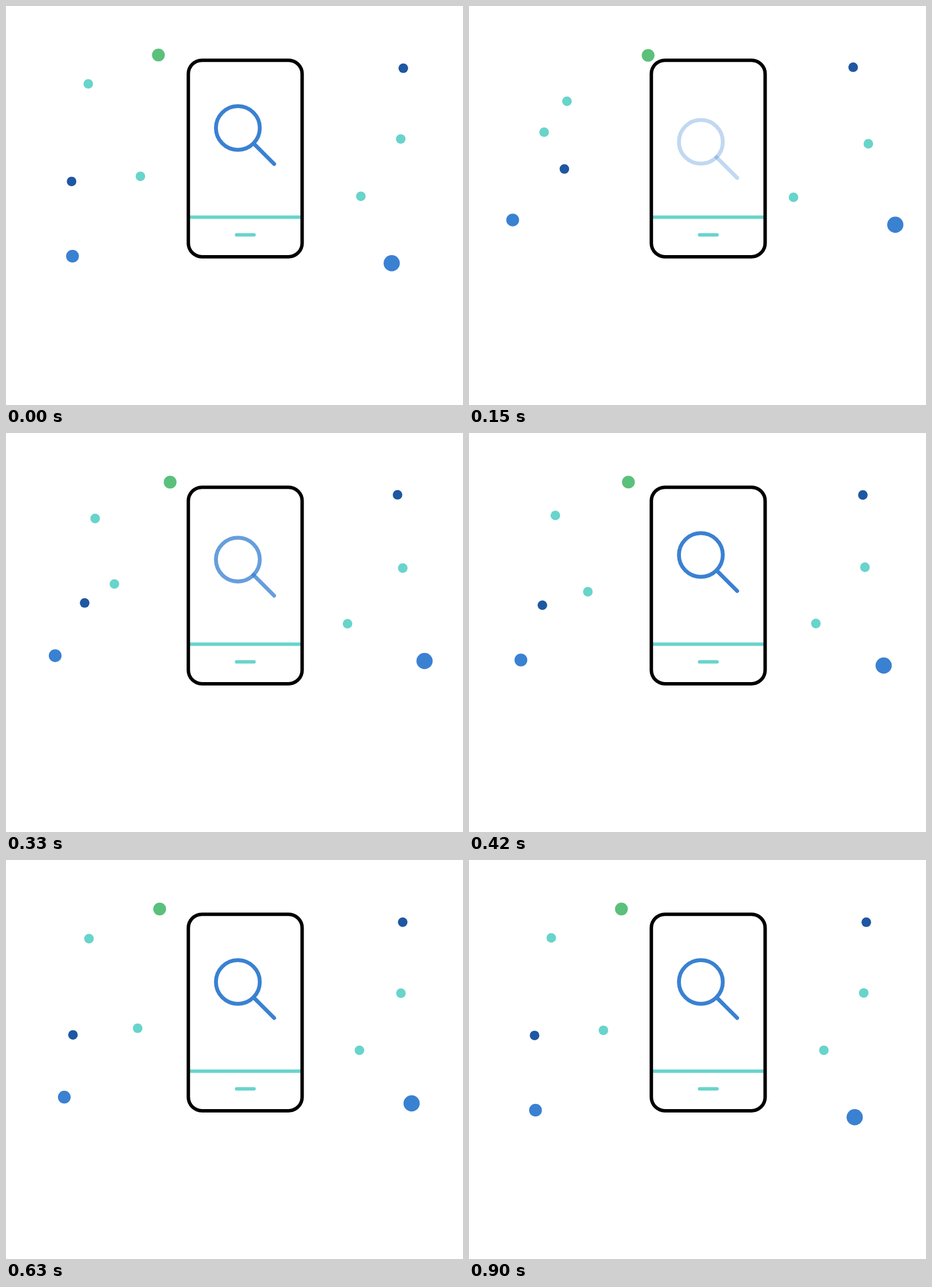
Write an HTML page that moves like this. It is 800x700 px and loops after 930 ms.

```html
<!DOCTYPE html>
<html lang="en">
<head>
<meta charset="utf-8">
<title>Mobile search</title>
<style>
  html, body { margin: 0; width: 100%; height: 100%; overflow: hidden; background: #fff; }
  svg { display: block; width: 100vw; height: 100vh; }
  .green { fill: #5bc07c; }
  .teal { fill: #68d4cb; }
  .navy { fill: #1e57a2; }
  .blue { fill: #3a81d2; }
  .bar { fill: none; stroke: #68d4cb; stroke-width: 6; }
  .glass > * { fill: none; stroke: #3a81d2; stroke-width: 6.8; stroke-linecap: round; }
</style>
</head>
<body>
<svg viewBox="0 0 800 700">
  <g id="dots"></g>
  <rect x="319.2" y="95.2" width="199.2" height="344.8" rx="24" fill="#fff"/>
  <path class="bar" d="M321 370.5H517"/>
  <path class="bar" d="M403.6 401.6H434.2" stroke-linecap="round"/>
  <rect x="319.2" y="95.2" width="199.2" height="344.8" rx="24" fill="none" stroke="#000" stroke-width="6"/>
  <g class="glass" id="glass">
    <circle cx="405.9" cy="214" r="38.4"/>
    <path d="M433.3 241L469.4 277.2"/>
  </g>
</svg>
<script>
  const LOOP = 930, STEP = 30, START = 30, END = 900;
  const glass = document.getElementById('glass');
  const layer = document.getElementById('dots');

  const clamp = v => Math.min(1, Math.max(0, v));
  const mix = (a, b, k) => a + (b - a) * k;
  const span = (t, from, to) => clamp((t - from) / (to - from));
  const easeOut = k => 1 - (1 - k) ** 3;
  const linear = k => k;

  function dot(color, r, from, to, ease = easeOut) {
    const el = document.createElementNS('http://www.w3.org/2000/svg', 'circle');
    el.setAttribute('class', color);
    el.setAttribute('r', r);
    layer.append(el);
    return { el, from, to, ease };
  }

  const dots = [
    dot('green', 11.2, [339.8, 86.9], [266.8, 86]),
    dot('teal', 8.4, [186.9, 184.2], [144, 136.6]),
    dot('teal', 8.4, [73.3, 178], [235.3, 298.8]),
    dot('navy', 8.4, [196.2, 273.7], [114.8, 307.8]),
    dot('navy', 8.4, [659.6, 106.5], [695.5, 109.2]),
    dot('teal', 8.4, [703.6, 246.4], [691, 233.3]),
    dot('teal', 8.4, [538.2, 336.6], [621.2, 333.8]),
    dot('blue', 11.2, [70.1, 365.3], [116.4, 438.9], linear)
  ];
  const big = dot('blue', 14.2);

  function place(el, x, y) {
    el.setAttribute('cx', x);
    el.setAttribute('cy', y);
  }

  function draw(now) {
    const step = Math.floor((now % LOOP) / STEP + 0.001);
    const t = step * STEP || END; // the loop opens on its resting pose
    const k = span(t, START, END);

    for (const { el, from, to, ease } of dots) {
      const e = ease(k);
      place(el, mix(from[0], to[0], e), mix(from[1], to[1], e));
    }

    // the large dot veers inwards near the end
    const x = t < 750 ? mix(755.3, 701, span(t, START, 750)) : mix(701, 675.2, span(t, 750, END));
    place(big.el, x, mix(372.9, 451.3, k));

    const rise = span(t, START, 420);
    glass.setAttribute('transform', `translate(0 ${35.1 * (1 - rise)})`);
    for (const part of glass.children) part.setAttribute('opacity', rise);
  }

  const origin = performance.now();
  function tick() {
    draw(performance.now() - origin);
    requestAnimationFrame(tick);
  }
  tick();
</script>
</body>
</html>
```
